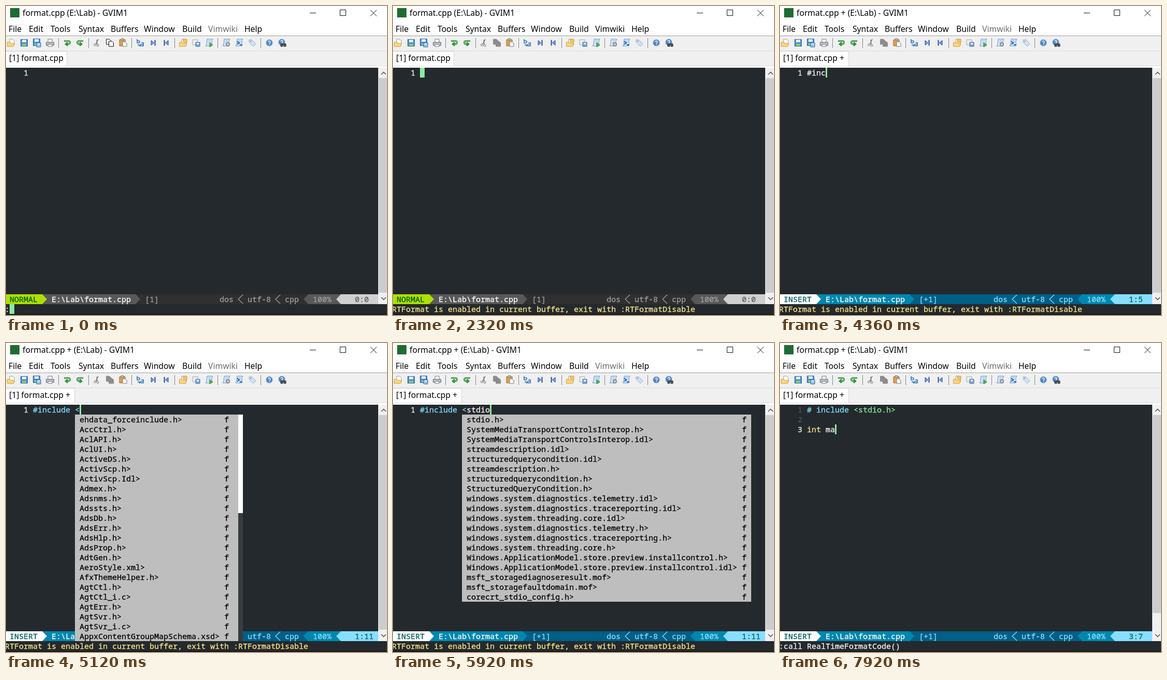
An HTML page for the animation above (8000 ms loop, 735 by 596 pixels).

```html
<!DOCTYPE html>
<html lang="en">
<head>
<meta charset="utf-8">
<title>Real-time formatting in an editor</title>
<style>
html, body { margin: 0; width: 100%; height: 100%; overflow: hidden; background: #fff; }
svg { display: block; }
text { white-space: pre; }
.ui text { font: 15.7px "Noto Sans", "Open Sans", sans-serif; fill: #000; }
.mono text { font: 15px "Noto Sans Mono", "DejaVu Sans Mono", monospace; stroke-width: .3px; }
.sep { stroke: #858585; }
.line { fill: none; stroke: #111; }
</style>
</head>
<body>
<svg width="735" height="596" viewBox="0 0 735 596">
  <defs>
    <g id="disk">
      <path d="M-6.5-6.5h13v13h-13z" fill="#4c8fd0" stroke="#2a62a4"/>
      <path d="M-4-6h8v5h-8z" fill="#e6f0fa"/>
      <path d="M-4 2h8v4h-8z" fill="#8fd06a"/>
    </g>
    <g id="folder">
      <path d="M-3-7h6l3 3v8h-9z" fill="#fff" stroke="#999"/>
      <path d="M-7.5-1h5l1 2h8l-2 6h-12z" fill="#fbd77c" stroke="#d49a35"/>
    </g>
    <g id="turn">
      <path id="hook" d="M-6-3.500H2.500a3 3 0 0 1 0 6H-1M1-.5l-3.500 3l3.500 3" fill="none" stroke="#2f8a3a" stroke-width="3.200"/>
      <path d="M-5.500-3.500H2.500a3 3 0 0 1 0 6H-1" fill="none" stroke="#7fd67c" stroke-width="1.200"/>
    </g>
    <g id="scroll">
      <path d="M-4-7H7l-2 3V6H-7l2-3z" fill="#dcecff" stroke="#5b8fc6"/>
      <path d="M-2-4h5M-2-1h5M-2 2h4" stroke="#83aedb"/>
    </g>
    <g id="skip"><path d="M-4-4.500L1.500 0L-4 4.500z" fill="#6ea3ee" stroke="#2346a8"/><path d="M3.500-5.500v11" stroke="#2346a8" stroke-width="2"/></g>
    <g id="help">
      <circle r="6.500" fill="#4d86c4" stroke="#c3d3e6"/>
      <path d="M-2-1.500a2 2 0 1 1 2.500 2V2M.5 3v1.500" fill="none" stroke="#fff" stroke-width="1.400"/>
    </g>
  </defs>

  <g class="ui">
    <path d="M0 0h735v119H0z" fill="#fff"/>
    <path d="M0 58h735v28H0zM0 87h735v28H0z" fill="#f0f0f0"/>
    <path d="M0 57.500h735" stroke="#a0a0a0"/>
    <path d="M0 86.500h735M0 115.500h735" stroke="#dcdcdc"/>
    <rect x="8" y="4" width="18" height="18" fill="#1f6b32"/>
    <path class="line" d="M586 13.500h12M644.500 7.500h11v11h-11zM703 7.500l12 12m0-12l-12 12"/>
    <text id="title" x="32" y="19"></text>
    <g id="menu"></g>
    <path id="tab" fill="#fff" stroke="#d5d5d5"/>
    <text id="tabText" x="6" y="106"></text>

    <path class="sep" d="M101.500 62v19M159.500 62v19M242.500 62v19M325.500 62v19M408.500 62v19M491.500 62v19"/>
    <use href="#folder" x="10" y="71"/>
    <use href="#disk" x="35" y="71"/>
    <g transform="translate(60 71)"><use href="#disk" x="-1" y="-1"/><path d="M-1 0h8v8h-8z" fill="#9fc6ee" stroke="#2a62a4"/><path d="M1 1h4v2h-4z" fill="#fff"/></g>
    <g transform="translate(85 71)"><path d="M-4-7h8v7h-8z" fill="#fff" stroke="#777"/><path d="M-7.500-1h15v6h-15z" fill="#b9c2cf" stroke="#5c6675"/><path d="M-4 3h8v4h-8z" fill="#fff" stroke="#777"/></g>
    <use href="#turn" x="118" y="71"/>
    <use href="#turn" transform="translate(143 71) scale(-1 1)"/>
    <g transform="translate(175 71)" fill="none" stroke="#777"><path d="M3-7L-2 3M0-6L1 3" stroke-width="1.500"/><circle cx="-3.500" cy="4" r="2"/><circle cx="2" cy="5" r="2"/></g>
    <g id="copy" transform="translate(200 71)"><path d="M-6.500-7h6l3 3v7h-9z"/><path d="M-1.500-3h6l3 3v7h-9z"/></g>
    <g transform="translate(226 71)"><path d="M-7-6H4V6H-7z" fill="#e2a04a" stroke="#99622a"/><path d="M-4-8h5v3h-5z" fill="#ccc" stroke="#777"/><path d="M-1-2h5l3 3v6h-8z" fill="#fff" stroke="#777"/></g>
    <g transform="translate(259 71)" fill="none" stroke="#2d72bd" stroke-width="1.600"><path d="M-6-7v7h3a2 2 0 0 0 0-4h-3M2 0h4v6H2a1.500 1.500 0 0 1 0-3h4"/><path d="M-4 2v3h4m-2-2l2 2l-2 2" stroke-width="1.200"/></g>
    <use href="#skip" x="284" y="71"/>
    <use href="#skip" transform="translate(309 71) scale(-1 1)"/>
    <g transform="translate(342 71)"><use href="#folder"/><path d="M0-7h7v6H0z" fill="#f6c65c" stroke="#d49a35"/></g>
    <g transform="translate(367 71)"><path d="M-7-6H3V4H-7z" fill="#eee" stroke="#a8a8a8"/><path d="M-1-1h8v8h-8z" fill="#75a9dc" stroke="#3a70ab"/><path d="M1 0h4v3h-4z" fill="#fff"/></g>
    <g transform="translate(392 71)"><use href="#scroll"/><path d="M1 0l6 4l-6 4z" fill="#4fbd4b" stroke="#2d8330"/></g>
    <g transform="translate(425 71)"><use href="#scroll"/><circle cx="3" cy="3" r="3" fill="#ddd" stroke="#888" stroke-width="2"/></g>
    <g transform="translate(450 71)"><use href="#scroll"/><path d="M-4-3l4 3l-4 3M1 4h5" fill="none" stroke="#1d62bc" stroke-width="2"/></g>
    <g transform="translate(475 71)"><path d="M-6-6h5l8 8l-5 5l-8-8z" fill="#cfe2f4" stroke="#91b2d2"/><circle cx="-3" cy="-3" r="1" fill="#fff" stroke="#c69"/></g>
    <use href="#help" x="508" y="71"/>
    <g transform="translate(533 71)"><use href="#help" x="-1" y="-1"/><path d="M-3 2h4v5h-4zM3 2h4v5h-4zM0 2h4" fill="#555" stroke="#333"/></g>
  </g>

  <path d="M0 119h718v456H0zM0 575h735v19H0z" fill="#24292d"/>
  <path d="M0 594h735v2H0z" fill="#1c1814"/>
  <path d="M718 119h17v456h-17z" fill="#f0f0f0"/>
  <rect id="thumb" x="719" y="139" width="16" fill="#cdcdcd"/>
  <path d="M724 132l4.500-4.500l4.500 4.500M724 562l4.500 4.500l4.500-4.500" fill="none" stroke="#505050" stroke-width="1.500"/>
  <g id="screen" class="mono"></g>
</svg>

<script>
const LOOP = 8000;
const WHITE = '#f8f8f4', CYAN = '#7fdfff', GREEN = '#8ce9a2', YELLOW = '#fce88a', DIM = '#4d5459';
const BG = '#24292d', LIGHT = '#bebebe';
const $ = id => document.getElementById(id);

// Screen grid: 9 by 19 cells
const X = col => 9 * col - 2;
const Y = row => 119 + 19 * row;
const esc = s => s.replace(/&/g, '&amp;').replace(/</g, '&lt;');
const text = (col, row, s, fill) => `<text x="${X(col)}" y="${Y(row) + 15}" fill="${fill}" stroke="${fill}">${esc(s)}</text>`;
const rect = (x, y, w, h, fill) => `<rect x="${x}" y="${y}" width="${w}" height="${h}" fill="${fill}"/>`;
const cells = (col, row, n, fill) => rect(X(col), Y(row), 9 * n, 19, fill);
const shape = (d, fill) => `<path d="${d}" fill="${fill}"/>`;

const THEMES = {
  NORMAL: { mode: ['#005f00', '#afdf00'], file: ['#fff', '#585858'], mid: ['#9e9e9e', '#303030'], pos: ['#626262', '#d0d0d0'] },
  INSERT: { mode: ['#005f5f', '#fff'], file: ['#fff', '#0087af'], mid: ['#87dfff', '#005f87'], pos: ['#005f5f', '#87dfff'] }
};

const headers = `ehdata_forceinclude.h AccCtrl.h AclAPI.h AclUI.h ActiveDS.h ActivScp.h ActivScp.Idl Admex.h
Adsnms.h Adssts.h AdsDb.h AdsErr.h AdsHlp.h AdsProp.h AdtGen.h AeroStyle.xml AfxThemeHelper.h AgtCtl.h
AgtCtl_i.c AgtErr.h AgtSvr.h AgtSvr_i.c AppxContentGroupMapSchema.xsd`.split(/\s+/);
const matches = `stdio.h SystemMediaTransportControlsInterop.h SystemMediaTransportControlsInterop.idl
streamdescription.idl structuredquerycondition.idl streamdescription.h structuredquerycondition.h
StructuredQueryCondition.h windows.system.diagnostics.telemetry.idl windows.system.diagnostics.tracereporting.idl
windows.system.threading.core.idl windows.system.diagnostics.telemetry.h windows.system.diagnostics.tracereporting.h
windows.system.threading.core.h Windows.ApplicationModel.store.preview.installcontrol.h
Windows.ApplicationModel.store.preview.installcontrol.idl msft_storagediagnoseresult.mof
msft_storagefaultdomain.mof corecrt_stdio_config.h`.split(/\s+/);
const wide = ['stdarg.h', 'stddef.h', 'stdint.h', 'stdlib.h', ...matches];
const narrow = [matches[0], matches[18]];

// Each step lists only what changes; a line is a list of [text, colour]
const steps = [[0, { mode: 'NORMAL', cmd: ':', cmdColor: WHITE, typing: true, lines: [[]], pos: '0:0', thumb: 414 }]];
const at = (time, change) => steps.push([time, change]);

[...'RTFo'].forEach((c, i) => at(160 * (i + 1), { cmd: ':' + 'RTFo'.slice(0, i + 1) }));
at(1080, { wild: 0, cmd: ':RTFormatDisable' });
at(1560, { wild: 1, cmd: ':RTFormatEnable' });
at(2320, { wild: null, typing: false, cmdColor: YELLOW,
  cmd: 'RTFormat is enabled in current buffer, exit with :RTFormatDisable' });
at(3440, { mode: 'INSERT', pos: '0:1' });
at(3720, { lines: [[['#', WHITE]]], pos: '1:2', changed: true });
[4040, 4200, 4360, 4520, 4680, 4840, 4960].forEach((time, i) =>
  at(time, { lines: [[['#include'.slice(0, i + 2), WHITE]]], pos: '1:' + (i + 3) }));
const include = s => [[['#include <', CYAN], [s, WHITE]]];
at(5120, { lines: include(''), pos: '1:11', list: headers, bar: 10 });
at(5440, { lines: include('s'), list: wide, bar: 12 });
at(5600, { lines: include('st'), bar: 17 });
at(5760, { lines: include('std'), list: matches, bar: 0 });
at(5920, { lines: include('stdio') });
at(6200, { lines: include('stdio.h'), list: narrow });
at(6520, { lines: [[['#include ', CYAN], ['<stdio.h>', GREEN]]], pos: '1:19', list: null });
const done = [['# include ', CYAN], ['<stdio.h>', GREEN]];
at(6840, { lines: [done, []], pos: '2:1', thumb: 398, cmd: ':call RealTimeFormatCode()', cmdColor: WHITE });
at(7000, { lines: [done, [], []], pos: '3:1', thumb: 382 });
const third = (time, a, b, color) =>
  at(time, { lines: [done, [], [[a, color], [b, WHITE]]], pos: '3:' + (a.length + b.length + 1) });
third(7440, 'i', '', WHITE);
third(7600, 'in', '', WHITE);
third(7760, 'int', ' ', YELLOW);
third(7920, 'int', ' ma', YELLOW);

let last = {};
const states = steps.map(([time, change]) => [time, last = { ...last, ...change }]);

function statusLine(s) {
  const t = THEMES[s.mode], y = Y(23), m = y + 9.5, b = y + 19;
  const right = (col, fill) => shape(`M${X(col)} ${y}l9 9.5l-9 9.5z`, fill);
  const left = (col, fill) => shape(`M${X(col + 1)} ${y}l-9 9.5l9 9.5z`, fill);
  const thin = col => `<path d="M${X(col + 1)} ${y + 1}L${X(col)} ${m}L${X(col + 1)} ${b - 1}" fill="none" stroke="${t.mid[0]}" stroke-width="1.3"/>`;
  return cells(0, 23, 80, t.mid[1]) + cells(8, 23, 20, t.file[1]) + right(28, t.file[1])
    + cells(0, 23, 8, t.mode[1]) + right(8, t.mode[1])
    + text(1, 23, s.mode, t.mode[0]) + text(10, 23, 'E:\\Lab\\format.cpp', t.file[0])
    + text(30, 23, s.changed ? '[+1]' : '[1]', t.mid[0])
    + text(46, 23, 'dos', t.mid[0]) + thin(50) + text(52, 23, 'utf-8', t.mid[0]) + thin(58) + text(60, 23, 'cpp', t.mid[0])
    + left(64, t.file[1]) + cells(65, 23, 15, t.file[1]) + text(66, 23, '100%', t.mid[0])
    + left(71, t.pos[1]) + cells(72, 23, 8, t.pos[1]) + text(75, 23, s.pos, t.pos[0]);
}

function wildMenu(pick) {
  const names = ['RTFormatDisable', 'RTFormatEnable'], cols = [0, 17];
  return names.map((n, i) => (i === pick ? cells(cols[i], 23, n.length, '#70e0ff') : '')
    + text(cols[i], 23, n, i === pick ? BG : WHITE)).join('');
}

function popup({ list, bar }) {
  const size = Math.max(...list.map(n => n.length)) + 1;
  const w = size + (bar ? 5 : 4), h = 19 * list.length;
  return rect(X(15), Y(1), 9 * w, h, LIGHT)
    + (bar ? rect(X(15 + w), Y(1), 9, h, '#363c40') + rect(X(15 + w), Y(1), 9, 19 * bar, '#fff') : '')
    + list.map((n, i) => text(16, i + 1, n + '>', '#000') + text(17 + size, i + 1, 'f', '#000')).join('');
}

function buffer(s) {
  const end = s.lines.length - 1;
  let out = '', col;
  s.lines.forEach((line, row) => {
    out += text(4, row, String(row + 1), row === end ? '#edf7f5' : DIM);
    col = 6;
    for (const [part, fill] of line) {
      out += text(col, row, part, fill);
      col += part.length;
    }
  });
  if (!s.typing) out += rect(X(col), Y(end), s.mode === 'INSERT' ? 3 : 9, 19, GREEN);
  return out;
}

const MENU = [['File', 5], ['Edit', 44], ['Tools', 86], ['Syntax', 140], ['Buffers', 202],
  ['Window', 266], ['Build', 340], ['Vimwiki', 390], ['Help', 460]];
$('menu').innerHTML = MENU.map(([name, x]) => `<text x="${x}" y="50">${name}</text>`).join('');
const wiki = $('menu').children[7];

function draw(s) {
  const name = 'format.cpp' + (s.changed ? ' +' : '');
  $('title').textContent = name + ' (E:\\Lab) - GVIM1';
  $('tabText').textContent = '[1] ' + name;
  $('tab').setAttribute('d', `M-1 87.500H${s.changed ? 132.5 : 117.5}V116H-1`);
  wiki.style.fill = s.typing || s.mode === 'INSERT' ? '#6d6d6d' : '#000';
  $('copy').setAttribute('fill', s.typing ? '#fff' : '#8c8c8c');
  $('copy').setAttribute('stroke', s.typing ? '#111' : '#8c8c8c');
  $('thumb').setAttribute('height', s.thumb);
  $('screen').innerHTML = buffer(s)
    + (s.wild == null ? statusLine(s) : wildMenu(s.wild))
    + text(0, 24, s.cmd, s.cmdColor)
    + (s.typing ? cells(s.cmd.length, 24, 1, GREEN) : '')
    + (s.list ? popup(s) : '');
}

const start = performance.now();
let shown;
function tick() {
  const t = Math.max(0, performance.now() - start) % LOOP;
  const state = states.filter(([time]) => time <= t).pop()[1];
  if (state !== shown) draw(shown = state);
  requestAnimationFrame(tick);
}
tick();
</script>
</body>
</html>
```
